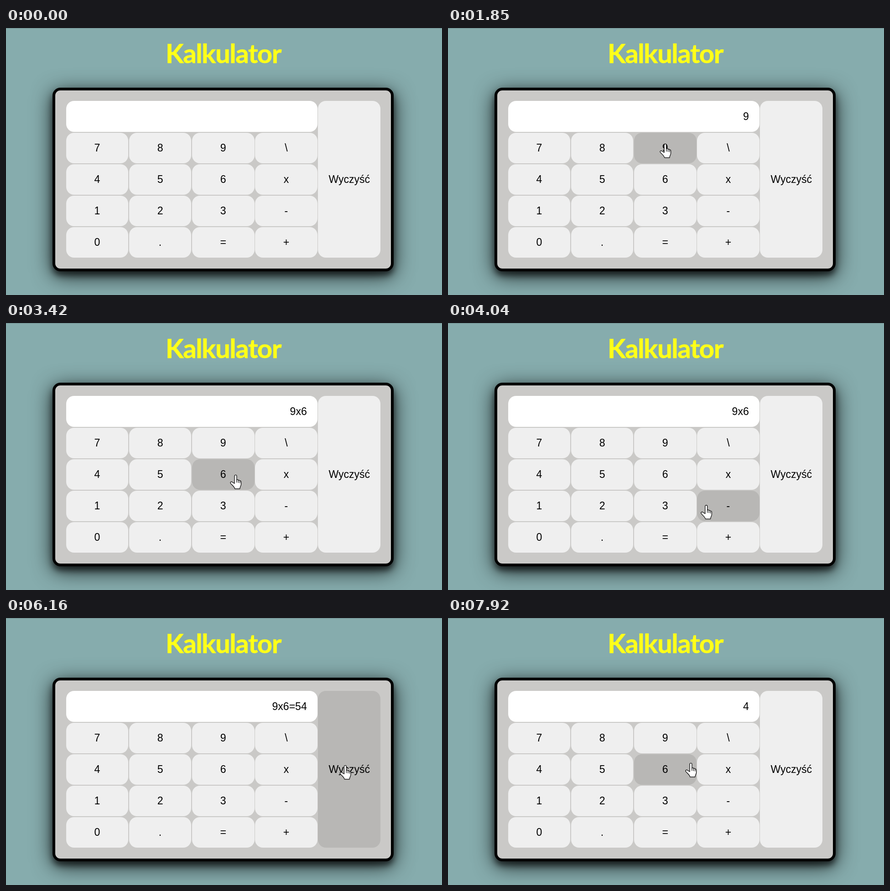
Animation of 956x586 px, one loop 8000 ms. Source, as an HTML page:

```html
<!DOCTYPE html>
<html lang="pl">
<head>
<meta charset="utf-8">
<title>Kalkulator</title>
<style>
  html, body { margin: 0; width: 100%; height: 100%; overflow: hidden; }
  body { position: relative; background: #86acad; font: 23px "Liberation Sans", Arial, sans-serif; color: #000; }
  body::before { content: ""; position: absolute; top: 0; left: 0; right: 0; height: 1px; background: #6b898a; }
  h1 {
    position: absolute; left: 0; top: 20px; width: 953px; margin: 0;
    font: 700 58px/70px Lato, sans-serif; letter-spacing: -1.4px;
    text-align: center; color: #ffff19; -webkit-text-stroke: .6px #ffff19;
  }
  #panel {
    position: absolute; left: 102px; top: 131px; width: 748px; height: 403px;
    box-sizing: border-box; border: 6px solid #000; border-radius: 17.3px;
    background: #cac9c7; box-shadow: 0 9px 14px #0009, 0 10px 46px #000c;
  }
  .cell {
    position: absolute; display: flex; align-items: center; justify-content: center;
    box-sizing: border-box; border-radius: 17.3px; background: #efefef;
  }
  .cell.hover { background: #b8b7b5; }
  #display.cell { justify-content: flex-end; padding-right: 23px; background: #fff; }
  #caret { position: absolute; left: 658px; top: 185px; width: 1px; height: 23px; background: #000; }
  #pointer { position: absolute; left: 0; top: 0; overflow: visible; }
  #pointer path { stroke: #000; stroke-width: 1.2; stroke-linejoin: round; stroke-linecap: round; }
</style>
</head>
<body>
<h1>Kalkulator</h1>
<div id="panel"></div>
<div id="caret"></div>
<svg id="pointer" width="1" height="1">
  <g id="hand" fill="#fff" transform="translate(1.3)">
    <path d="M-2.5 19V2.6a2.4 2.4 0 0 1 4.8 0V11q3.5-1.3 3.6 1 3.2-.8 3.4 1.2 2.7-.4 2.7 2.3v5c0 4-2.6 5-2.8 10h-11c-1-4.5-5-7-9-11.5-2-2.8 1-5 3.5-3z"/>
    <path d="M2.3 11v5.5M5.9 12v5M9.3 13.2v4.5" fill="none"/>
  </g>
  <path id="arrow" d="M0 0V24L5.5 19 9.3 28 13 26.4 9.3 17.7H17Z" fill="#fff"/>
  <path id="beam" d="M-4-10q4 0 4 2 0-2 4-2M0-8V8M-4 10q4 0 4-2 0 2 4 2" fill="none"/>
  <circle id="click" r="17.3" fill="#ff0" fill-opacity=".47"/>
</svg>
<script>
const LOOP = 8000, LEFT = 131.6, TOP = 160.4, COL = 138.2, ROW = 69.1, GAP = 1.7;
const STEP = 77, PRESS = 140, BLINK = 500;
const el = id => document.getElementById(id);
const cells = {};

function addCell(key, label, col, row, cols = 1, rows = 1) {
  const node = document.createElement('div');
  const x = LEFT + col * COL, y = TOP + row * ROW;
  const w = cols * COL - GAP, h = rows * ROW - GAP;
  node.className = 'cell';
  node.textContent = label;
  node.style.cssText = `left:${x}px;top:${y}px;width:${w}px;height:${h}px`;
  el('panel').after(node);
  cells[key] = {
    node, cx: x + w / 2, cy: y + h / 2,
    contains: (px, py) => px >= x && px <= x + w && py >= y && py <= y + h
  };
}

addCell('display', '', 0, 0, 4);
[...'789\\456x123-0.=+'].forEach((c, i) => addCell(c, c, i % 4, 1 + (i >> 2)));
addCell('clear', 'Wyczyść', 4, 0, 1, 5);
const { display, ...buttons } = cells;
display.node.id = 'display';

// The visit: which cell, when reached, when clicked, offset from its centre
const stops = [
  { key: '+', at: 360, dx: 150, dy: 50 },
  { key: '+', at: 436, dx: 58 },
  { key: 'display', at: 820, click: 990, dx: 187, dy: -19 },
  { key: '9', at: 1550, click: 1710 },
  { key: 'x', at: 2320, click: 2400 },
  { key: '6', at: 2870, click: 3050, dx: 11 },
  { key: '6', at: 3420, dx: 26, dy: 1 },
  { key: '-', at: 3810, dx: -39 },
  { key: '=', at: 4280, click: 4510 },
  { key: '=', at: 5300, dx: 29, dy: -16 },
  { key: 'clear', at: 5840, dx: 60 },
  { key: 'clear', at: 6160, click: 6380, dx: -10 },
  { key: '4', at: 7070, dx: 20, dy: -31 },
  { key: '4', at: 7150, click: 7230 },
  { key: '6', at: 7920, dx: 55, dy: -14 }
];

// Longer ways take more time, but never start before the last click ends
stops.forEach((s, i) => {
  const { dx = -1, dy = -9 } = s, prev = stops[i - 1];
  s.x = cells[s.key].cx + dx;
  s.y = cells[s.key].cy + dy;
  if (!prev) return;
  const free = prev.click ? prev.click + PRESS : prev.at;
  const time = Math.min(400, 3 * Math.hypot(s.x - prev.x, s.y - prev.y), s.at - free);
  s.steps = Math.max(1, Math.round(time / STEP));
});

const clicks = stops.filter(s => s.click);
const focused = clicks.find(s => s.key === 'display').click;
const ease = p => p * p * (3 - 2 * p);

function pointerAt(t) {
  let { x, y } = stops[0];
  for (const s of stops.slice(1)) {
    const left = Math.ceil(Math.max(0, s.at - t) / STEP);
    const p = ease(Math.max(0, 1 - left / s.steps));
    x += (s.x - x) * p;
    y += (s.y - y) * p;
  }
  return [x, y];
}

function enter(text, { key }) {
  if (key === 'display') return text;
  if (key === 'clear') return '';
  if (key === '=') return `${text}=${text.split('x').reduce((a, b) => a * b)}`;
  return text + key;
}

const show = (id, on) => { el(id).style.display = on ? '' : 'none'; };

function render(t) {
  const [x, y] = pointerAt(t);
  const visible = t >= stops[0].at;
  let overButton = false;
  for (const b of Object.values(buttons)) {
    const over = visible && b.contains(x, y);
    b.node.classList.toggle('hover', over);
    overButton ||= over;
  }
  const overDisplay = display.contains(x, y);
  display.node.textContent = clicks.filter(s => t >= s.click + PRESS).reduce(enter, '');
  el('pointer').style.transform = `translate(${x}px,${y}px)`;
  show('pointer', visible);
  show('hand', overButton);
  show('beam', overDisplay);
  show('arrow', !overButton && !overDisplay);
  show('click', clicks.some(s => t >= s.click && t < s.click + PRESS));
  show('caret', t >= focused && t < focused + BLINK);
}

const origin = performance.now();
function tick() {
  render((performance.now() - origin) % LOOP);
  requestAnimationFrame(tick);
}
tick();
</script>
</body>
</html>
```
